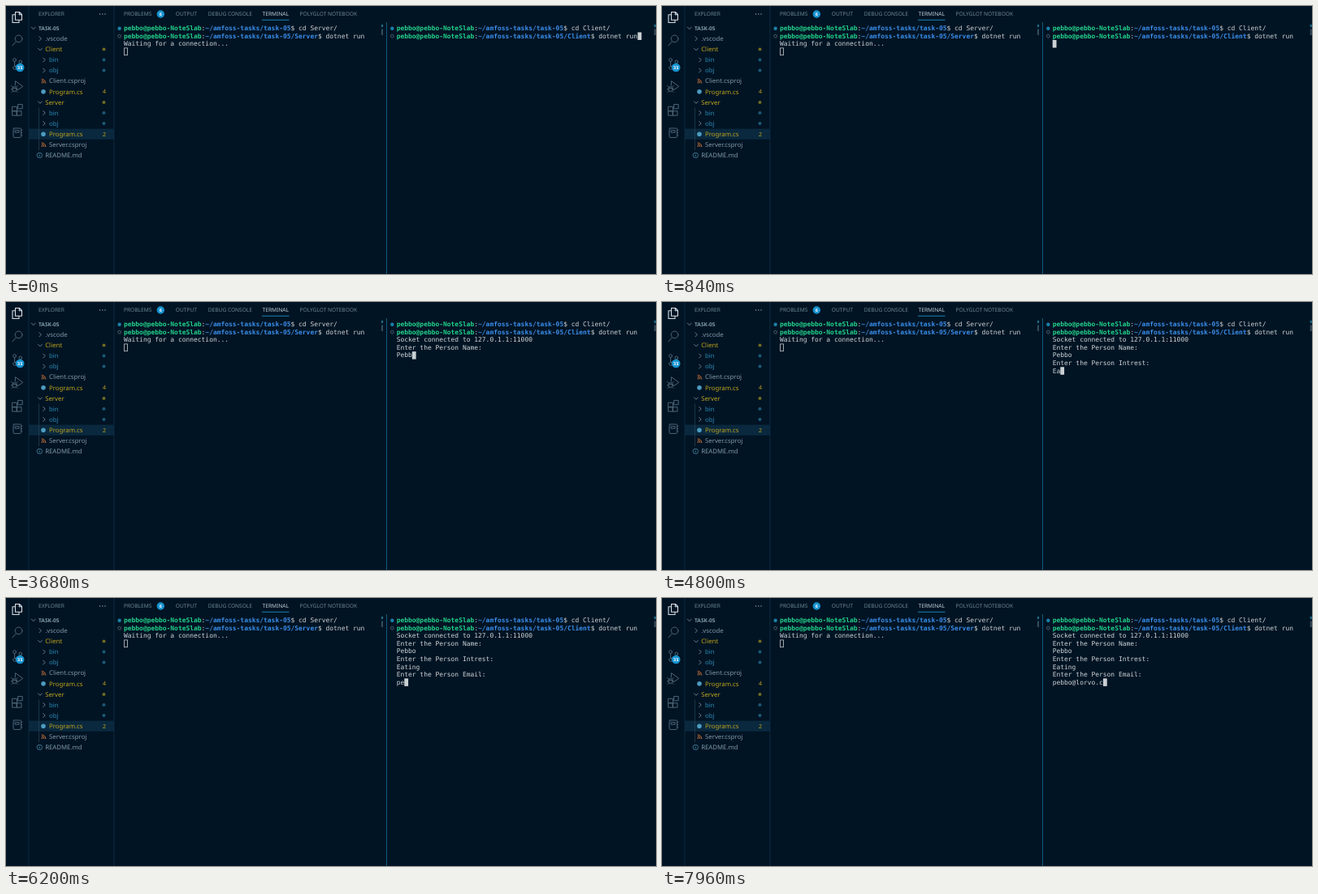
Recreate the animation shown at these times as an HTML page. Size 800 px wide and 331 px high, loop 8 s.

```html
<!DOCTYPE html>
<html lang="en">
<head>
<meta charset="utf-8">
<title>Client and server terminals</title>
<style>
html, body { margin: 0; width: 100%; height: 100%; overflow: hidden; background: #011424; }
svg { display: block; width: 100%; height: 100%; }
text { white-space: pre; text-rendering: geometricPrecision; }
.ui { font-family: "Noto Sans", "Open Sans", sans-serif; font-size: 7.8px; }
.tab { font-family: "Noto Sans", "Open Sans", sans-serif; font-size: 6.6px; fill: #6d8799; }
.num { font-family: "Noto Sans", "Open Sans", sans-serif; font-size: 5.4px; font-weight: 600; fill: #fff; text-anchor: middle; }
.mono { font-family: "DejaVu Sans Mono", monospace; font-size: 7.95px; fill: #d0d4d6; }
.icon { fill: none; stroke: #4b6578; stroke-width: 1; stroke-linejoin: round; stroke-linecap: round; }
.chev { fill: none; stroke: #8299aa; stroke-width: .8; }
</style>
</head>
<body>
<svg id="stage" viewBox="0 0 800 331">
  <rect width="800" height="331" fill="#011424"/>
  <rect x="28" y="151.6" width="105" height="13.1" fill="#0a293e"/>
  <path d="M28 0V331M133 0V331" stroke="#0a2b41" stroke-width="1"/>
  <path d="M468.4 0V331" stroke="#0f5a7d" stroke-width="1.3" clip-path="inset(20px 0 0 0)" id="split"/>

  <g class="icon">
    <g stroke="#d5dde3" stroke-width="1.1">
      <path d="M11.5 7.5h5l3 3v6.7h-8zM16.3 7.5v3.2h3.2"/>
      <path d="M11.3 10.8H8v9.7h8v-3"/>
    </g>
    <circle cx="15.6" cy="40.4" r="4.4"/><path d="M12.4 43.8L8 48.8"/>
    <circle cx="10.6" cy="66.6" r="1.9"/><circle cx="10.6" cy="76.4" r="1.9"/><circle cx="17.8" cy="69" r="1.9"/>
    <path d="M10.6 68.5v6M17.8 71c0 2.5-4 1.8-6.5 3.5"/>
    <path d="M11.4 98V92.6L20.8 99.2L14.6 103.6"/>
    <ellipse cx="10.5" cy="102.6" rx="2.5" ry="3.2"/>
    <path d="M8 101.4h5M8.3 100L6.8 98.8M12.7 100l1.5-1.2M8 103H6.4M13 103h1.6M8.4 105L7 106.4M12.6 105l1.4 1.4"/>
    <path d="M8 124.3h5.5v5.5H8zM8 129.8h5.5v5.4H8zM13.5 129.8h5.5v5.4h-5.5zM15 121.6h5.2v5.2H15z"/>
    <rect x="9" y="151" width="9.6" height="11.4" rx="1"/>
    <path d="M11.4 153.7h4.8v2.5h-4.8zM18.6 153.4h1.2M18.6 156.6h1.2M18.6 159.8h1.2"/>
  </g>
  <circle cx="17.2" cy="76" r="5.3" fill="#1793d1"/><text class="num" x="17.2" y="78">33</text>

  <text class="tab" x="40" y="11.9" fill="#8299aa">EXPLORER</text>
  <g fill="#8ba3b3"><circle cx="115.6" cy="10" r=".7"/><circle cx="118.8" cy="10" r=".7"/><circle cx="122" cy="10" r=".7"/></g>
  <path d="M40.5 125.5V178" stroke="#2a4a5d" stroke-width=".6"/>
  <g id="tree"></g>
  <g id="tabs"></g>
  <circle cx="190.3" cy="10" r="4.7" fill="#1793d1"/><text class="num" x="190.3" y="12">6</text>
  <path d="M315 17.3h33.5" stroke="#1780b0" stroke-width="1"/>

  <g id="panes"></g>
  <rect x="145.6" y="51.9" width="3.9" height="8.8" fill="none" stroke="#c4cacd" stroke-width=".8"/>
  <g id="output"></g>
  <rect id="cursor" width="4.8" height="9.5" fill="#cbd0d3"/>
</svg>
<script>
const LOOP = 8000, CELL = 4.786, LINE = 9.56, TOP = 22.9;
const LEFT = 145, RIGHT = 480.7;
const GOLD = '#c0a51c', BLUE = '#2d88b4', GREY = '#8199aa';
const byId = id => document.getElementById(id);

function add(parent, tag, attrs, text) {
  const el = document.createElementNS('http://www.w3.org/2000/svg', tag);
  for (const key in attrs) el.setAttribute(key, attrs[key]);
  if (text !== undefined) el.textContent = text;
  parent.appendChild(el);
  return el;
}

// Explorer rows: label, indent, colour, icon, mark
const rows = [
  ['TASK-05', 0, GREY, 'open'],
  ['.vscode', 1, GREY, 'shut'],
  ['Client', 1, GOLD, 'open', 'dot'],
  ['bin', 2, BLUE, 'shut', 'dot'],
  ['obj', 2, BLUE, 'shut', 'dot'],
  ['Client.csproj', 2, GREY, 'feed'],
  ['Program.cs', 2, GOLD, 'code', '4'],
  ['Server', 1, GOLD, 'open', 'dot'],
  ['bin', 2, BLUE, 'shut', 'dot'],
  ['obj', 2, BLUE, 'shut', 'dot'],
  ['Program.cs', 2, GOLD, 'code', '2'],
  ['Server.csproj', 2, GREY, 'feed'],
  ['README.md', 1, GREY, 'info']
];

function drawIcon(g, kind, x, y) {
  if (kind === 'open') add(g, 'path', { class: 'chev', d: `M${x - 2.7} ${y - 1.3}l2.7 2.7l2.7 -2.7` });
  if (kind === 'shut') add(g, 'path', { class: 'chev', d: `M${x - 1.3} ${y - 2.7}l2.7 2.7l-2.7 2.7` });
  if (kind === 'code') add(g, 'circle', { cx: x - .8, cy: y, r: 2.8, fill: '#4c9bc0' });
  if (kind === 'feed') {
    add(g, 'circle', { cx: x - 2.4, cy: y + 2, r: .8, fill: '#d0743c' });
    add(g, 'path', { d: `M${x - 3} ${y - .4}a3 3 0 0 1 3 3M${x - 3} ${y - 2.3}a5 5 0 0 1 5 5`,
      fill: 'none', stroke: '#d0743c', 'stroke-width': 1 });
  }
  if (kind === 'info') {
    add(g, 'circle', { cx: x, cy: y, r: 3.2, fill: 'none', stroke: '#4c88a8', 'stroke-width': .8 });
    add(g, 'path', { d: `M${x} ${y - .5}v2.3M${x} ${y - 1.9}v.8`, stroke: '#4c88a8', 'stroke-width': .8 });
  }
}

function drawTree() {
  const g = byId('tree');
  rows.forEach(([label, indent, fill, icon, mark], i) => {
    const y = 27.2 + i * 13.1;
    const x = indent ? 43.4 + indent * 4.8 : 40;
    drawIcon(g, icon, icon === 'info' ? 41.3 : x - 6.2, y);
    const style = indent ? '' : 'font-size:6.6px;font-weight:700';
    add(g, 'text', { class: 'ui', x, y: y + (indent ? 2.7 : 2.4), fill, style }, label);
    if (mark === 'dot') add(g, 'circle', { cx: 120.5, cy: y, r: 2, fill, opacity: .6 });
    else if (mark) add(g, 'text', { class: 'ui', x: 121, y: y + 2.5, fill, 'text-anchor': 'middle', style: 'font-size:7px' }, mark);
  });
}

function drawTabs() {
  const tabs = [['PROBLEMS', 145], ['OUTPUT', 208.8], ['DEBUG CONSOLE', 248.8], ['TERMINAL', 315.6], ['POLYGLOT NOTEBOOK', 361.6]];
  for (const [label, x] of tabs) {
    const style = label === 'TERMINAL' ? 'fill:#c5d0d8' : '';
    add(byId('tabs'), 'text', { class: 'tab', x, y: 11.9, style }, label);
  }
}

const baseline = row => TOP + row * LINE + 7.3;

function drawPrompt(x, row, path, command) {
  const line = add(byId('panes'), 'text', { class: 'mono', x, y: baseline(row) });
  add(line, 'tspan', { fill: '#23d18b', 'font-weight': 700 }, 'pebbo@pebbo-NoteSlab');
  add(line, 'tspan', {}, ':');
  add(line, 'tspan', { fill: '#3b8eea', 'font-weight': 700 }, path);
  add(line, 'tspan', {}, '$ ' + command);
}

function drawPane(x, folder, command) {
  const g = byId('panes'), home = '~/amfoss-tasks/task-05';
  drawPrompt(x, 0, home, `cd ${folder}/`);
  drawPrompt(x, 1, `${home}/${folder}`, command);
  add(g, 'circle', { cx: x - 5.4, cy: 27.7, r: 2.2, fill: '#1b81a8' });
  add(g, 'circle', { cx: x - 5.4, cy: 37.2, r: 1.9, fill: 'none', stroke: '#647784', 'stroke-width': .7 });
  add(g, 'rect', { x: x + 317, y: 23, width: 2, height: 3, fill: '#1b718f' });
  add(g, 'rect', { x: x + 317, y: 28.5, width: 2, height: 7.5, fill: '#354c5c' });
}

// Text arriving in the client terminal: time, characters
const feed = [
  [0, ' '.repeat(52) + 'dotnet run'],
  [560, '\n'],
  [2240, 'Socket connected to 127.0.1.1:11000\nEnter the Person Name:\n'],
  ...typed('Pebb', [3360, 3440, 3480, 3640]), [3880, 'o'],
  [4240, '\nEnter the Person Intrest:\n'],
  [4800, 'Ea'], ...typed('ting', [5160, 5240, 5320, 5400]),
  [5800, '\nEnter the Person Email:\n'],
  ...typed('pebbo@', [6120, 6200, 6360, 6440, 6480, 6560]),
  ...typed('lorvo.c', [7360, 7440, 7520, 7640, 7720, 7840, 7960])
];

function typed(word, times) {
  return times.map((time, i) => [time, word[i]]);
}

drawTree();
drawTabs();
drawPane(LEFT, 'Server', 'dotnet run');
drawPane(RIGHT, 'Client', '');
add(byId('panes'), 'text', { class: 'mono', x: LEFT, y: baseline(2) }, 'Waiting for a connection...');
const output = Array.from({ length: 8 }, (_, i) =>
  add(byId('output'), 'text', { class: 'mono', x: RIGHT, y: baseline(i + 1) }, ''));

function render(t) {
  const lines = feed.filter(([time]) => time <= t).map(([, chars]) => chars).join('').split('\n');
  output.forEach((el, i) => {
    const line = lines[i] || '';
    if (el.textContent !== line) el.textContent = line;
  });
  const last = lines.length - 1;
  byId('cursor').setAttribute('x', RIGHT + lines[last].length * CELL);
  byId('cursor').setAttribute('y', TOP + (last + 1) * LINE);
}

const start = performance.now();
function tick() {
  render((performance.now() - start) % LOOP);
  requestAnimationFrame(tick);
}
tick();
</script>
</body>
</html>
```
